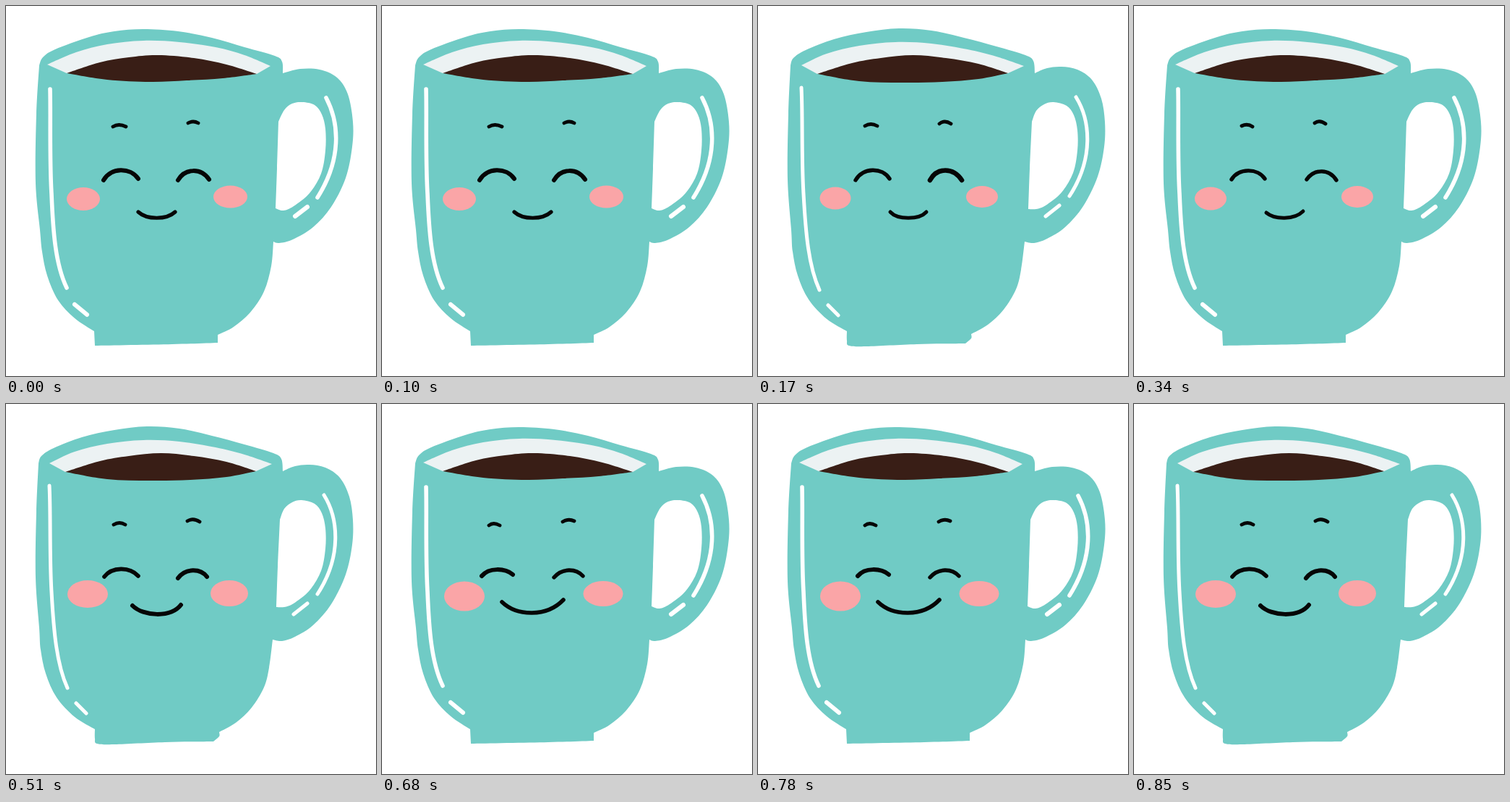
An HTML page for the animation above (1020 ms loop, 512 by 512 pixels).

```html
<!DOCTYPE html>
<html lang="en">
<head>
<meta charset="utf-8">
<title>Smiling mug</title>
<style>
  html, body { margin: 0; width: 100%; height: 100%; overflow: hidden; background: #fff; }
  svg { display: block; width: 100vw; height: 100vh; }
  .line { fill: none; stroke: #060606; stroke-linecap: round; stroke-linejoin: round; }
  .shine { fill: none; stroke: #fff; stroke-linecap: round; }
</style>
</head>
<body>
<svg viewBox="0 0 512 512">
  <path id="cup" fill="#70cbc5" fill-rule="evenodd"/>
  <path id="rim" fill="#ecf2f3"/>
  <path id="coffee" fill="#391e16"/>
  <path id="glow" class="shine"/>
  <path id="dash" class="shine"/>
  <ellipse id="cheekL" fill="#faa5a7"/>
  <ellipse id="cheekR" fill="#faa5a7"/>
  <path id="brows" class="line" stroke-width="4.8"/>
  <path id="eyeL" class="line"/>
  <path id="eyeR" class="line"/>
  <path id="mouth" class="line"/>
</svg>
<script>
const STEP = 170;
const $ = id => document.getElementById(id);
const set = (id, attrs) => {
  for (const k in attrs) $(id).setAttribute(k, attrs[k]);
};

// Smooth curve through the points of one run
function smooth(run, first) {
  const p = run.split(' ').map(s => s.split(',').map(Number));
  const at = i => p[Math.max(0, Math.min(p.length - 1, i))];
  let d = (first ? 'M' : 'L') + p[0];
  for (let i = 0; i < p.length - 1; i++) {
    const [a, b, c, e] = [at(i - 1), at(i), at(i + 1), at(i + 2)];
    const c1 = b.map((v, k) => v + (c[k] - a[k]) / 6);
    const c2 = c.map((v, k) => v - (e[k] - b[k]) / 6);
    d += `C${c1} ${c2} ${c}`;
  }
  return d;
}
// Runs meet at sharp corners
const shape = (...runs) => runs.map((r, i) => smooth(r, !i)).join('') + 'Z';

const mugs = [
  {
    cup: shape(
      '46,82 51,71 68,60 115,43 150,35 190,32 238,35 285,44 330,57 372,69 382,77 383,93',
      '383,93 407,87 434,88 458,99 473,122 480,160 479,195 470,238 450,278 425,306 397,323 378,328 370,326',
      '370,326 367,360 357,395 338,424 315,444 293,455',
      '293,466 230,468 123,470',
      '122,450 95,432 72,407 57,373 50,340 47,310 41,245 42,150 46,82'
    ) + shape(
      '377,160 385,144 396,135 410,133 427,137 437,150 442,170 442,200 436,232 420,259 398,277 384,283 373,280',
      '373,280 375,225 377,160'
    ),
    rim: shape('57,81 97,64 140,53 190,48 240,50 290,57 330,68 366,83', '347,94 200,100 84,93'),
    coffee: shape('84,93 130,78 170,71 210,68 260,72 305,81 347,94', '347,94 300,100 250,103 200,105 140,102 84,93'),
    glow: 'M61 115C62 150 60 210 63 260C65 310 68 357 84 390M443 127C462 163 464 213 431 265',
    dash: 'M95 413L112 427M400 291L417 278',
    glowW: 5.6, dashW: 6
  },
  {
    cup: shape(
      '45,82 49,72 66,61 105,46 150,36 195,31 240,34 285,44 330,56 370,68 381,76 383,93',
      '383,93 400,86 420,84 442,88 462,102 475,128 480,160 479,195 470,236 450,277 425,306 400,322 382,328 369,326',
      '369,326 364,365 357,392 340,420 318,441 295,454',
      '295,454 295,460 287,467',
      '287,467 220,468 150,471 126,470 123,463 123,450',
      '123,450 95,433 70,406 55,373 48,340 46,310 41,240 42,150 45,82'
    ) + shape(
      '379,160 385,145 396,136 409,133 427,138 437,151 442,172 442,200 436,231 420,258 398,276 385,281 374,281',
      '374,281 376,225 379,160'
    ),
    rim: shape('60,82 95,66 140,55 190,50 240,52 290,60 330,70 368,83', '346,93 205,100 82,94'),
    coffee: shape('82,94 130,79 170,72 215,68 260,72 305,80 346,93', '346,93 305,101 255,105 200,106 140,104 82,94'),
    glow: 'M60 113C62 150 60 210 63 260C66 315 70 360 85 393M440 126C460 158 465 211 431 263',
    dash: 'M97 414L111 428M398 291L417 276',
    glowW: 5, dashW: 5
  }
];

const calm = {
  brows: 'M148 167Q156 162 166 167M252 162Q259 158 266 162',
  eyeL: 'M135 241C145 223 172 223 183 239', eyeR: 'M238 241C248 224 270 224 281 240',
  mouth: 'M183 285C195 296 222 296 234 285',
  cheekL: [107, 267, 23, 16], cheekR: [310.5, 264, 23.5, 15.5], w: [6, 6, 5.2]
};
const soft = {
  brows: 'M148 166Q156 161 165 166M251 163Q258 157 267 163',
  eyeL: 'M135 241C145 223 172 223 182 239', eyeR: 'M238 241C248 223 270 223 282 241',
  mouth: 'M183 285C193 296 223 296 233 285',
  cheekL: [107, 266, 21.5, 15.5], cheekR: [310, 264, 22, 15], w: [5.4, 6.6, 5]
};
const warm = {
  brows: 'M149 166Q157 162 164 167M250 162Q257 157 265 163',
  eyeL: 'M135 240C145 224 171 224 181 239', eyeR: 'M239 240C250 225 270 225 280 241',
  mouth: 'M183 286C195 296 222 296 234 284',
  cheekL: [106, 266.5, 22, 16], cheekR: [309, 264, 22, 15], w: [5.4, 5.4, 5]
};
const smile = {
  brows: 'M149 167Q157 162 165 167M251 162Q259 157 268 163',
  eyeL: 'M136 239C147 225 171 225 183 238', eyeR: 'M238 241C248 227 269 227 278 239',
  mouth: 'M175 279C190 294 228 296 242 278',
  cheekL: [113, 263, 28, 19], cheekR: [309, 262, 26, 18], w: [5.6, 6, 6]
};
const grin = {
  brows: 'M148 168Q154 163 163 168M250 163Q258 158 266 162',
  eyeL: 'M138 238C148 226 170 227 181 236', eyeR: 'M238 240C249 227 268 227 278 238',
  mouth: 'M166 274C187 294 228 295 251 271',
  cheekL: [114, 266, 28, 20.5], cheekR: [306, 262.5, 27.5, 17.5], w: [6, 5.4, 5.6]
};
const faces = [calm, soft, warm, smile, grin, smile];

function cheek(id, [cx, cy, rx, ry]) {
  set(id, { cx, cy, rx, ry });
}

function draw(ms) {
  const i = Math.floor(ms / STEP) % faces.length;
  const mug = mugs[i % 2], face = faces[i];
  for (const id of ['cup', 'rim', 'coffee']) set(id, { d: mug[id] });
  set('glow', { d: mug.glow, 'stroke-width': mug.glowW });
  set('dash', { d: mug.dash, 'stroke-width': mug.dashW });
  set('brows', { d: face.brows });
  ['eyeL', 'eyeR', 'mouth'].forEach((id, k) => set(id, { d: face[id], 'stroke-width': face.w[k] }));
  cheek('cheekL', face.cheekL);
  cheek('cheekR', face.cheekR);
}

const start = performance.now();
function tick() {
  draw(performance.now() - start);
  requestAnimationFrame(tick);
}
tick();
</script>
</body>
</html>
```
